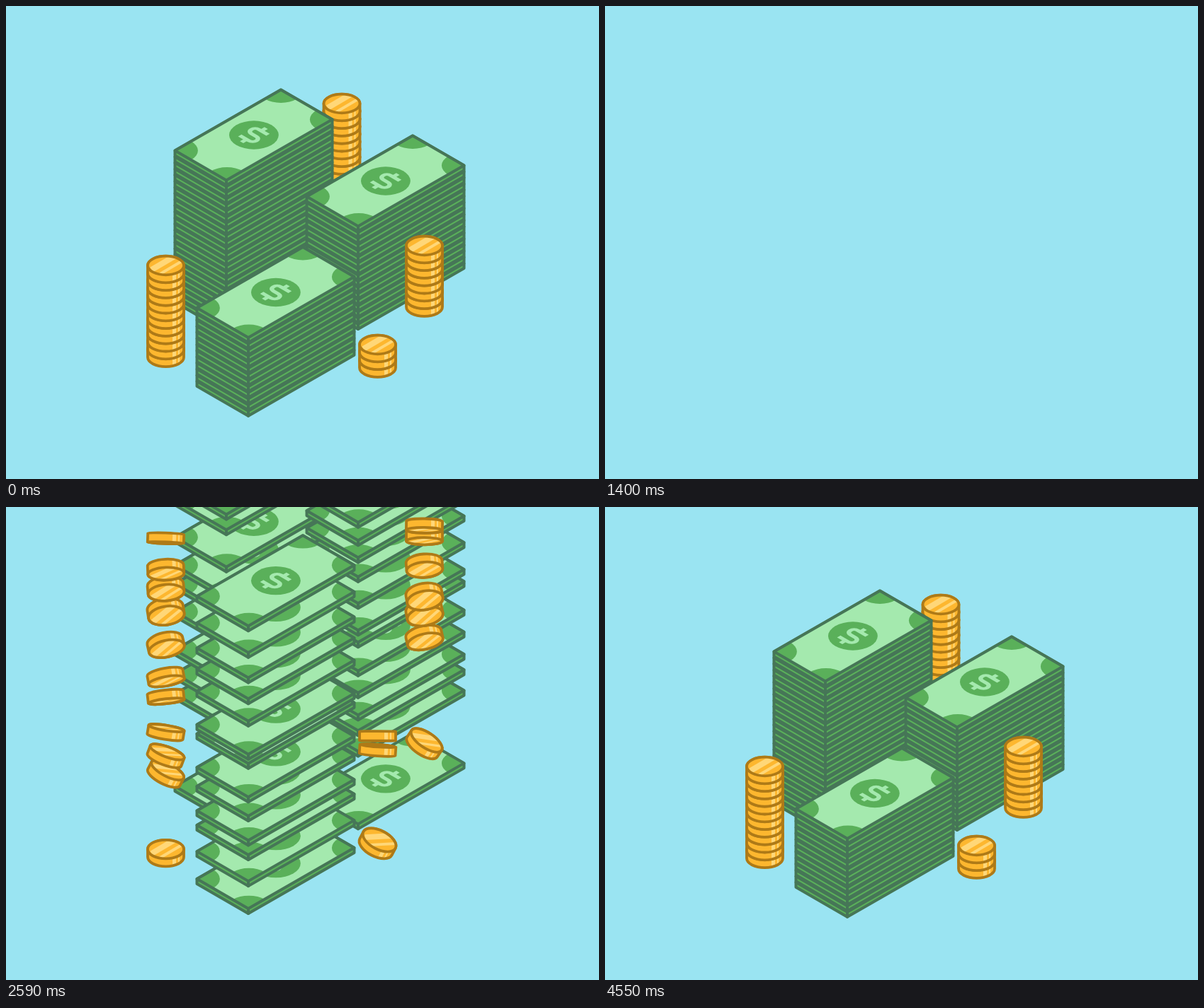
Write an HTML page with a canvas that moves like this. It is 837 by 669 pixels and loops after 4.62 s.

```html
<!DOCTYPE html>
<html lang="en">
<head>
<meta charset="utf-8">
<title>Money stacks</title>
<style>
html, body { margin: 0; width: 100%; height: 100%; overflow: hidden; background: #9ae4f2; }
canvas { display: block; }
</style>
</head>
<body>
<canvas id="stage" width="837" height="669"></canvas>
<script>
const ctx = document.getElementById('stage').getContext('2d');
const LOOP = 4620, STEP = 70, EMPTY = 1680;
const GRAVITY = 0.00314, LEAD = 130;
const SKY = '#9ae4f2', DARK = '#467657', GREEN = '#5ab05a', PALE = '#a4e9ae';
const RIM = '#ae7a17', GOLD = '#fdb72f', SHINE = '#ffd778';
const DOLLAR = new Path2D('M11-12H-4A6 6 0 0 0-4 0H4A6 6 0 0 1 4 12H-11M0-12V-20M0 12V20');

// x, y: the top item at rest. leave, land: times for the lowest and the highest item.
const columns = [
  { draw: coin, pitch: 10.8, count: 14, x: 474, y: 143.5, leave: [720, 900], land: [2680, 3260] },
  { draw: bill, pitch: 8.65, count: 25, x: 388, y: 118.5, leave: [450, 950], land: [2611, 3400] },
  { draw: bill, pitch: 8.65, count: 17, x: 574, y: 183.5, leave: [425, 830], land: [2565, 3030] },
  { draw: bill, pitch: 8.65, count: 13, x: 419, y: 341, leave: [470, 745], land: [2502, 2909] },
  { draw: coin, pitch: 10.8, count: 12, x: 225.5, y: 372.5, leave: [600, 800], land: [2562, 2991] },
  { draw: coin, pitch: 10.8, count: 8, x: 590.5, y: 344.5, leave: [585, 830], land: [2691, 2976] },
  { draw: coin, pitch: 10.8, count: 3, x: 524.5, y: 484.5, leave: [540, 690], land: [2627, 2775] },
];

const lerp = (a, b, p) => a + (b - a) * p;

function random(seed) {
  const v = Math.sin(seed * 12.9898) * 43758.5453;
  return v - Math.floor(v);
}

// Items go from the bottom up, at uneven intervals but always in order.
columns.forEach((column, c) => {
  const { count, leave, land } = column;
  column.items = Array.from({ length: count }, (_, i) => ({
    rest: column.y + (count - 1 - i) * column.pitch,
    leave: lerp(leave[0], leave[1], (i + random(c * 40 + i + 1)) / count),
    land: i ? lerp(land[0] + LEAD, land[1], (i - 1 + random(c * 40 + i + 500)) / (count - 1)) : land[0],
  }));
});

function bounce(since) {
  for (let length = 560, height = 9; height > .5; length *= .6, height *= .35) {
    if (since < length) return -4 * height * (since / length) * (1 - since / length);
    since -= length;
  }
  return 0;
}

function offset(item, t) {
  if (t < EMPTY) return GRAVITY * Math.max(0, t - item.leave) ** 2;
  const left = item.land - t;
  return left > 0 ? -(0.8 * left + 0.00045 * left * left) : bounce(-left);
}

function polygon(points) {
  ctx.beginPath();
  points.forEach(p => ctx.lineTo(...p));
  ctx.closePath();
}

function paint(fill, stroke) {
  ctx.fillStyle = fill;
  ctx.fill();
  ctx.strokeStyle = stroke;
  ctx.stroke();
}

function disc(x, y, r) {
  ctx.beginPath();
  ctx.arc(x, y, r, 0, 2 * Math.PI);
  ctx.fill();
}

function bill() {
  const thick = 7;
  const top = [0, 0], right = [72.5, 42], front = [-77, 128], left = [-149.5, 86];
  const low = ([x, y]) => [x, y + thick];
  ctx.lineWidth = 4;
  polygon([top, right, low(right), low(front), low(left), left]);
  paint(GREEN, DARK);
  polygon([front, low(front)]);
  ctx.stroke();

  polygon([top, right, front, left]);
  ctx.fillStyle = PALE;
  ctx.fill();
  ctx.save();
  ctx.clip();
  ctx.transform(.866, .5, -.866, .5, 0, 0);
  const w = 84, h = 172;
  ctx.fillStyle = GREEN;
  for (const x of [0, w]) for (const y of [0, h]) disc(x, y, 26);
  ctx.translate(w / 2, h / 2);
  disc(0, 0, 28.5);
  ctx.lineWidth = 5.5;
  ctx.strokeStyle = PALE;
  ctx.stroke(DOLLAR);
  ctx.restore();

  polygon([top, right, front, left]);
  ctx.strokeStyle = DARK;
  ctx.stroke();
}

function line(x1, y1, x2, y2, width) {
  ctx.lineWidth = width;
  ctx.strokeStyle = SHINE;
  ctx.beginPath();
  ctx.moveTo(x1, y1);
  ctx.lineTo(x2, y2);
  ctx.stroke();
}

// A coin tumbles with its height above the landing place.
function coin(height) {
  const flip = Math.cos(Math.PI * (height / 260) ** 1.45);
  const tilt = 60 * Math.sin(Math.PI * height / 161) * Math.exp(-height / 150);
  const side = Math.sign(flip) || 1;
  const rx = 25.5, ry = Math.max(.3, 13.3 * Math.abs(flip));
  const half = 6.5 - Math.abs(flip);
  const body = new Path2D(), face = new Path2D();
  body.ellipse(0, half, rx, ry, 0, 0, Math.PI);
  body.ellipse(0, -half, rx, ry, 0, Math.PI, 2 * Math.PI);
  body.closePath();
  face.ellipse(0, -side * half, rx, ry, 0, 0, 2 * Math.PI);

  const outline = path => {
    ctx.lineWidth = 3.8;
    ctx.strokeStyle = RIM;
    ctx.stroke(path);
  };
  ctx.rotate(tilt * Math.PI / 180);
  ctx.fillStyle = GOLD;
  ctx.fill(body);
  for (const [x, width] of [[12, 5], [18.5, 2]]) {
    const y = side * ry * Math.sqrt(1 - (x / rx) ** 2);
    line(x, y - half, x, y + half, width);
  }
  outline(body);
  if (ry < 1) return;

  ctx.fill(face);
  ctx.save();
  ctx.clip(face);
  ctx.translate(0, -side * half);
  ctx.scale(1, ry / 13.3);
  line(-20, 6, 14, -14, 8);
  line(-8, 12, 26, -8, 4);
  ctx.restore();
  outline(face);
}

function render(now) {
  const t = Math.floor(now % LOOP / STEP) * STEP;
  ctx.fillStyle = SKY;
  ctx.fillRect(0, 0, 837, 669);
  ctx.lineJoin = 'round';
  for (const { draw, x, items } of columns) {
    for (const item of items) {
      const shift = offset(item, t);
      const y = item.rest + shift;
      if (y < -150 || y > 700) continue;
      const falling = t >= EMPTY && t < item.land;
      ctx.save();
      ctx.translate(x, y);
      draw(falling ? -shift : 0);
      ctx.restore();
    }
  }
}

const begin = performance.now();
function tick() {
  render(performance.now() - begin);
  requestAnimationFrame(tick);
}
tick();
</script>
</body>
</html>
```
